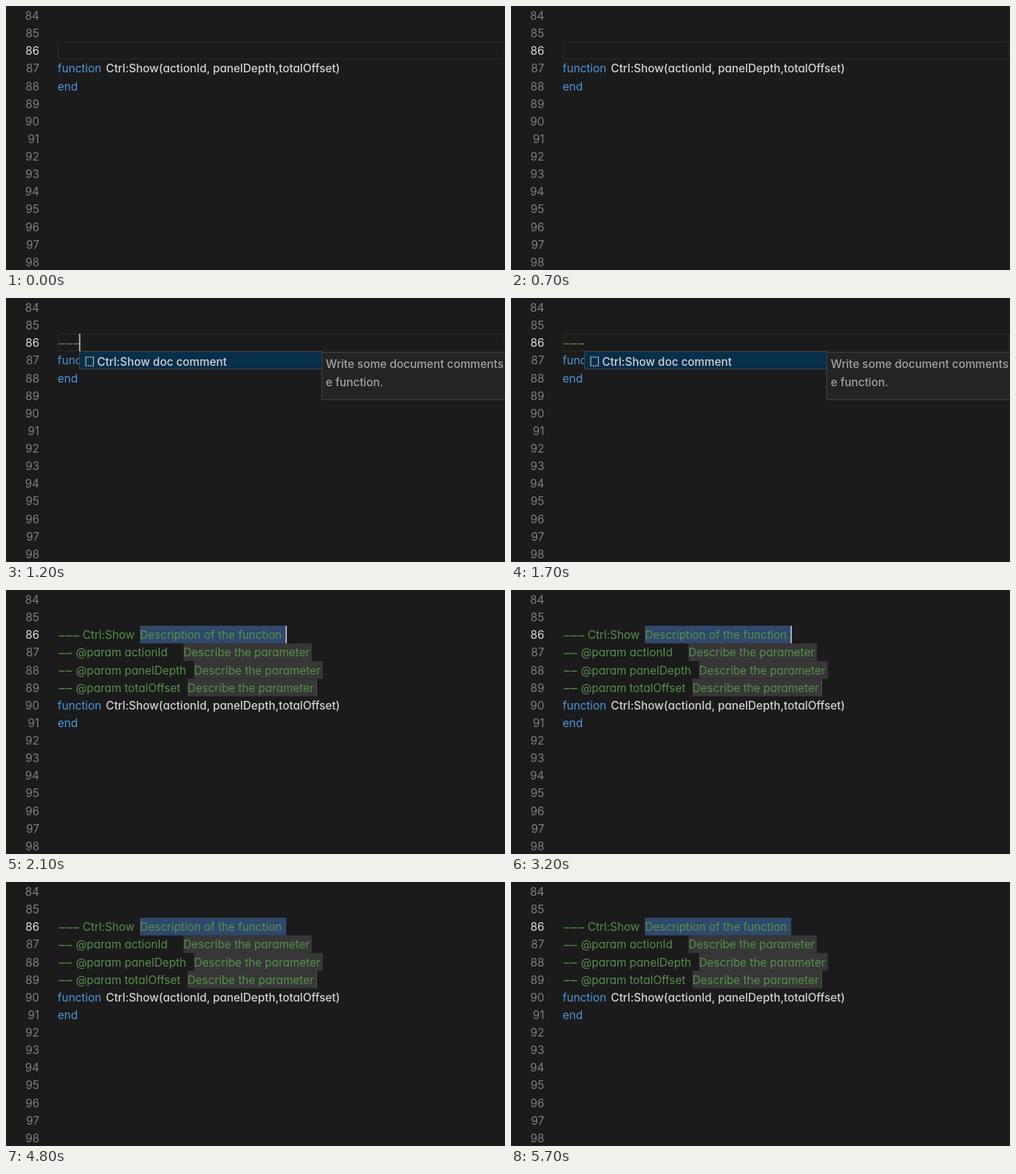
An HTML page that plays this animation: 682x362 px, repeating every 5800 ms.

```html
<!DOCTYPE html>
<html lang="en">
<head>
<meta charset="utf-8">
<title>Doc comment snippet</title>
<style>
html, body { margin: 0; width: 100%; height: 100%; overflow: hidden; background: #1b1b1b; }
svg { display: block; width: 682px; height: 362px; }
text { font: 400 15.4px Inter, "Noto Sans", sans-serif; font-feature-settings: "cv11", "calt" 0; }
.code { font-weight: 500; }
</style>
</head>
<body>
<svg id="stage" viewBox="0 0 682 362"></svg>
<script>
const LOOP = 5800, FIRST = 84, TOP = 1.4, ROW = 24.13;
const BLUE = '#4a96dd', WHITE = '#d2d2d2', GREEN = '#55904a';
const stage = document.getElementById('stage');

function add(parent, tag, attrs, content) {
  const node = document.createElementNS('http://www.w3.org/2000/svg', tag);
  for (const key in attrs) node.setAttribute(key, attrs[key]);
  if (content) node.textContent = content;
  parent.appendChild(node);
  return node;
}
const group = () => add(stage, 'g', {});
const rect = (parent, x, y, width, height, fill, stroke = 'none') =>
  add(parent, 'rect', { x, y, width, height, fill, stroke });
const write = (parent, x, y, fill, content, cls = '') =>
  add(parent, 'text', { x, y, fill, class: cls }, content);
const baseline = line => TOP + (line - FIRST) * ROW + 17.6;
const show = (node, on) => node.setAttribute('visibility', on ? 'visible' : 'hidden');

// Row of comment dashes
function dashes(parent, line, count) {
  const y = baseline(line) - 5;
  return Array.from({ length: count }, (_, i) =>
    rect(parent, 72 + i * 9.7, y, 8.6, 1.3, GREEN));
}

function declaration(line) {
  const g = group();
  write(g, 70.6, baseline(line), BLUE, 'function');
  write(g, 136.6, baseline(line), WHITE, 'Ctrl:Show(actionId, panelDepth,totalOffset)', 'code');
  write(g, 70.6, baseline(line + 1), BLUE, 'end');
  return g;
}

function field(parent, line, name, x, width) {
  rect(parent, x, 49 + (line - 86) * 24.2, width, 24.2, '#373737');
  dashes(parent, line, 2);
  write(parent, 95.5, baseline(line), GREEN, '@param ' + name);
  write(parent, x, baseline(line), GREEN, 'Describe the parameter');
}

for (let line = FIRST; line <= 98; line++) {
  add(stage, 'text', {
    x: 45.5, y: baseline(line), 'text-anchor': 'end',
    fill: line === 86 ? '#dedede' : '#7f7f7f'
  }, String(line));
}

const before = declaration(87);
const typing = group();
rect(typing, 71.5, 49.5, 609, 23, 'none', '#292929');
const typed = dashes(typing, 86, 3);

const popup = group();
rect(popup, 100.5, 73.5, 331, 24, '#062f4a', '#3f4447');
add(popup, 'path', { d: 'M109 92V81H119.5V92', fill: 'none', stroke: '#b4b4b4', 'stroke-width': 1.2 });
add(popup, 'path', { d: 'M108.5 93H120', stroke: '#b4b4b4', 'stroke-width': 1.5, 'stroke-dasharray': '2 1.2' });
write(popup, 124.5, 92.6, '#d2d2d2', 'Ctrl:Show doc comment', 'code');
rect(popup, 431.5, 74.5, 260, 65, '#242424', '#414141');
write(popup, 437, 96.4, '#a2a2a2', 'Write some document comments', 'code');
write(popup, 437, 120.6, '#a2a2a2', 'e function.', 'code');

const after = declaration(90);
rect(after, 183, 49, 200, 24.2, '#30486b');
dashes(after, 86, 3);
write(after, 104.8, baseline(86), GREEN, 'Ctrl:Show');
write(after, 183, baseline(86), GREEN, 'Description of the function');
field(after, 87, 'actionId', 242.5, 175.5);
field(after, 88, 'panelDepth', 257, 176);
field(after, 89, 'totalOffset', 248, 176);
rect(after, 424, 122, 1, 24, '#555');

const caret = rect(stage, 0, 49, 1.8, 24, '#bcbcbc');

const caretOn = t =>
  t < 800 ? t >= 200 && t < 700 :
  t < 2100 ? t < 1600 :
  t < 2500 || Math.floor(t / 500) % 2 === 0;

function draw(t) {
  const inserted = t >= 2100;
  const count = [800, 1000, 1200].filter(at => t >= at).length;
  show(before, !inserted);
  show(typing, !inserted);
  show(after, inserted);
  show(popup, t >= 1200 && !inserted);
  typed.forEach((dash, i) => show(dash, !inserted && i < count));
  caret.setAttribute('x', inserted ? 382 : 71 + count * 9.6);
  show(caret, caretOn(t));
}

const start = performance.now();
function tick() {
  draw((performance.now() - start) % LOOP);
  requestAnimationFrame(tick);
}
draw(0);
requestAnimationFrame(tick);
</script>
</body>
</html>
```
